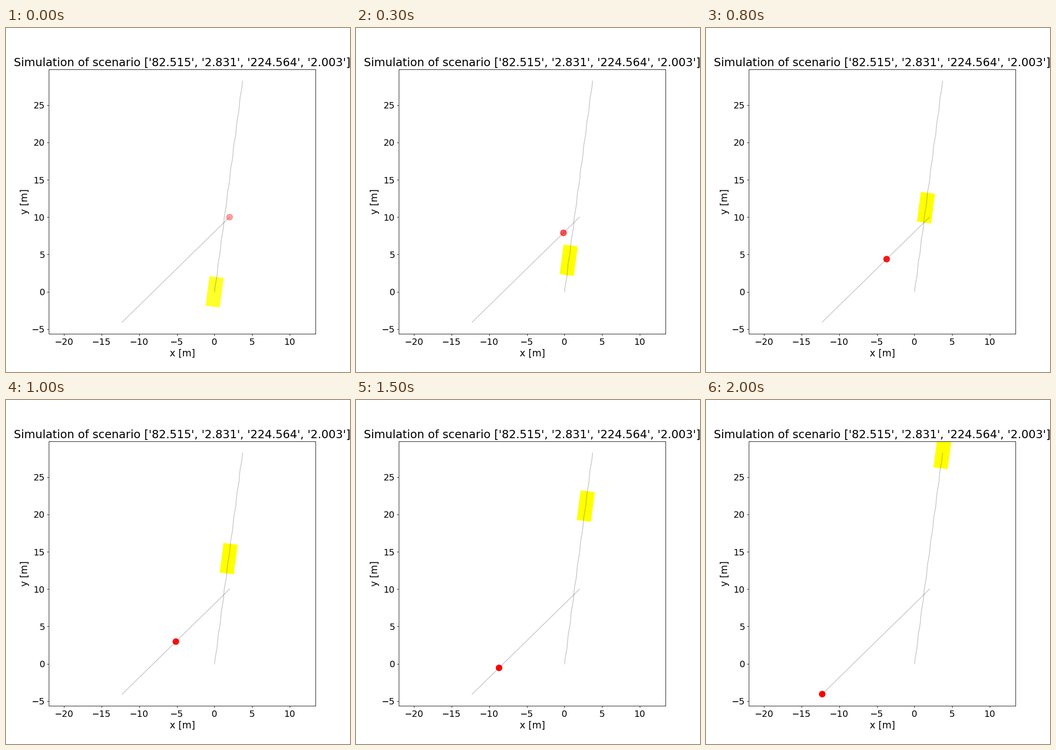
Write a matplotlib script that moves like this. It is 748 by 748 pixels and loops after 2100 ms.

```python
import numpy as np
import matplotlib.pyplot as plt
from matplotlib.animation import FuncAnimation
from matplotlib.patches import Circle, Rectangle

STEPS = 21
CAR_ANGLE, CAR_STEP = 82.515, 1.408
CAR_W, CAR_L = 1.9, 4.0
WALK_ANGLE, WALK_LENGTH = 224.564, 20.03
WALK_START = np.array([2, 10])

plt.rcParams.update({
    "font.family": "DejaVu Sans",
    "axes.titlesize": 20.2,
    "axes.labelsize": 17,
    "xtick.labelsize": 16,
    "ytick.labelsize": 16,
})


def drive(y):
    """Points on a straight course with a slight steering wobble."""
    wobble = 0.02 + 0.035 * np.cos(2 * np.pi * (y - 2.2) / 3.15)
    return np.column_stack([y / np.tan(np.radians(CAR_ANGLE)) + wobble, y])


def walk(dist):
    a = np.radians(WALK_ANGLE)
    return WALK_START + np.outer(dist, (np.cos(a), np.sin(a)))


def stacked(alpha, layers):
    """Opacity of several equal translucent layers."""
    return 1 - (1 - alpha) ** layers


car_path = drive(CAR_STEP * np.arange(STEPS))
walk_path = walk(np.linspace(0, WALK_LENGTH, STEPS))
road = drive(np.linspace(0, CAR_STEP * (STEPS - 1) + 0.05, 2 * STEPS - 1))

fig, ax = plt.subplots(figsize=(8.5, 8.5), dpi=88)
fig.subplots_adjust(left=0.1247, right=0.8997, bottom=0.1104, top=0.8802)
ax.set_xlim(-22.02, 13.43)
ax.set_ylim(-5.65, 29.8)
ax.set_xticks(range(-20, 11, 5))
ax.set_yticks(range(-5, 26, 5))
ax.set_title("Simulation of scenario ['82.515', '2.831', '224.564', '2.003']")
ax.set_xlabel("x [m]")
ax.set_ylabel("y [m]")

for path in (road, walk_path):
    ax.plot(*path.T, color="black", alpha=0.2, lw=1.5)

car = Rectangle((0, 0), CAR_W, CAR_L, angle=CAR_ANGLE - 90,
                rotation_point="center", fc="yellow", ec="none")
walker = Circle(WALK_START, 0.4, fc="red", ec="red", lw=1)
ax.add_patch(car)
ax.add_patch(walker)


def update(i):
    car.set_xy(car_path[i] - (CAR_W / 2, CAR_L / 2))
    car.set_alpha(stacked(0.6, i + 2))
    walker.center = tuple(walk_path[i])
    walker.set_alpha(stacked(0.2, i + 2))
    return car, walker


anim = FuncAnimation(fig, update, frames=STEPS, interval=100,
                     repeat=True, repeat_delay=0, blit=False)
plt.show()
```
